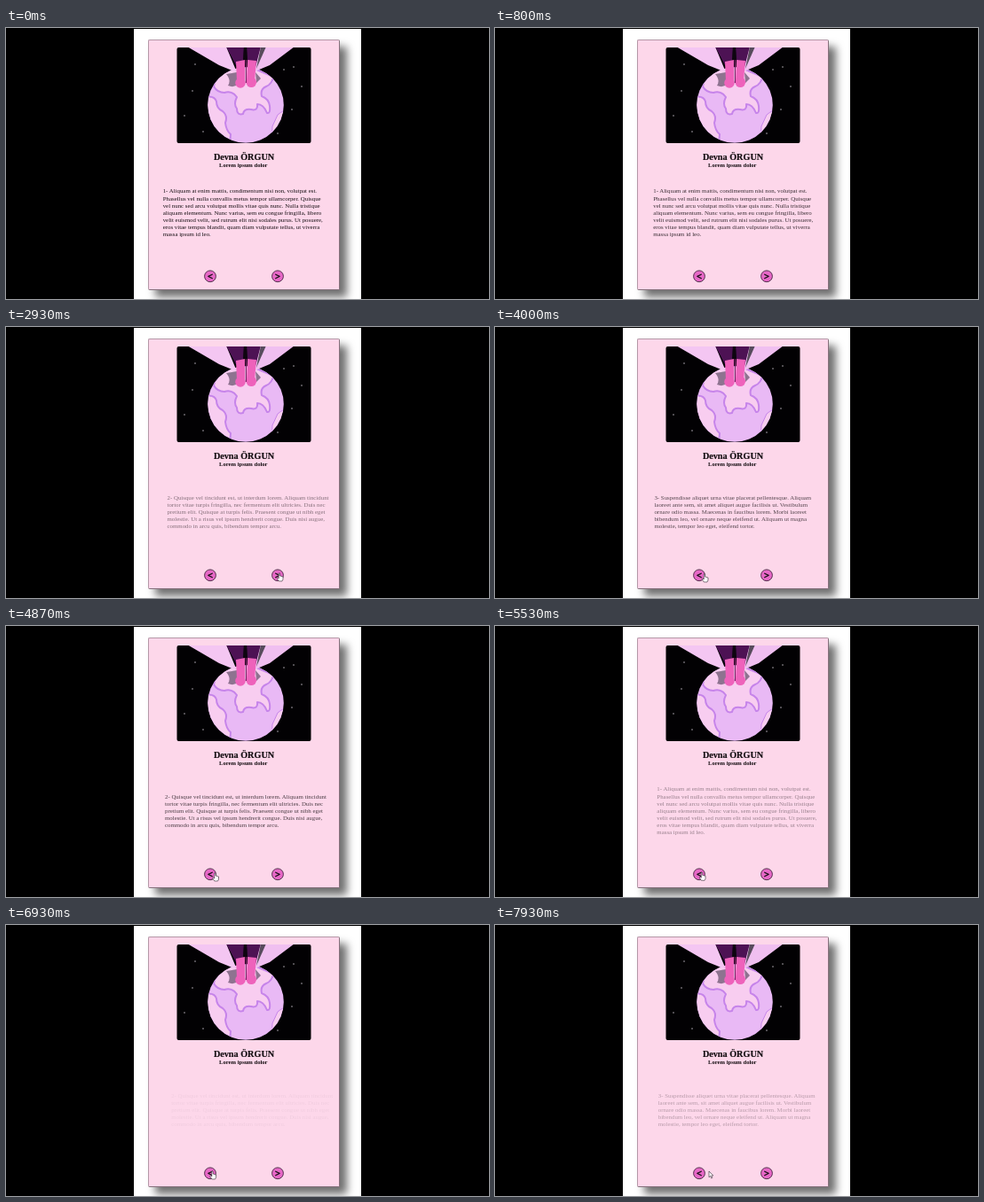
Recreate the animation shown at these times as an HTML page. Size 544 by 306 pixels, loop 8000 ms.

```html
<!DOCTYPE html>
<html lang="en">
<head>
<meta charset="utf-8">
<title>Card slider</title>
<style>
  html, body { margin: 0; width: 100%; height: 100%; overflow: hidden; background: #000; }
  .page { position: absolute; left: 144px; top: 1px; width: 256px; height: 305px; overflow: hidden; background: #fff; }
  .card {
    position: absolute; left: 16px; top: 12px; width: 214px; height: 281px;
    border: 1px solid; border-color: #b597a7 #85707c #85707c #b597a7;
    border-radius: 2px; background: #fdd7ea;
    box-shadow: 8px 8px 10px #707070;
  }
  svg { position: absolute; left: 0; top: -1px; }
  text { font-family: "Liberation Serif", "Times New Roman", serif; fill: #161014; }
  .mid { text-anchor: middle; font-weight: bold; }
  .slide text { font-size: 6.87px; }
</style>
</head>
<body>
<div class="page">
  <div class="card"></div>
  <svg width="256" height="306" viewBox="144 0 256 306">
    <defs>
      <clipPath id="photo"><rect x="192.5" y="22" width="151" height="108" rx="2"/></clipPath>
      <clipPath id="disc"><circle cx="270" cy="87" r="42.5"/></clipPath>
    </defs>

    <g clip-path="url(#photo)">
      <rect x="192" y="22" width="152" height="109" fill="#020103"/>
      <g id="stars" fill="#d8d0da"></g>
      <circle cx="270" cy="87" r="42.8" fill="#e9b9f5"/>
      <g clip-path="url(#disc)" fill="#f8cdf0" stroke="#c684ea" stroke-width="2" stroke-linejoin="round">
        <path d="M236 58Q250 42 275 44L301 55Q300 63 293 66Q286 69 288 77Q296 80 297 88Q298 97 294 96Q290 86 283 86Q284 94 276 92Q268 91 267 97Q260 99 260 91Q256 86 260 78Q254 70 246 73Q238 73 234 66Z"/>
        <path d="M224 78Q235 76 237 83Q237 91 244 94Q250 99 247 107Q248 116 253 120L252 132L226 126Z"/>
        <path d="M306 98Q313 92 316 94L308 118Q298 122 300 111Z" stroke-width="1"/>
      </g>
      <path d="M204 21H248L260 50L240 42Z" fill="#f4c6f2"/>
      <path d="M325 21H286L278 50L297 42Z" fill="#f0bff0"/>
      <path d="M248 52Q254 59 250 65Q257 68 262 63L260 50ZM281 50L287 57L282 62Z" fill="#8e7390"/>
      <path d="M248 21H268L267 44H260ZM271 21H287L281 44H272Z" fill="#4d1254"/>
      <path d="M268 21H271L272 40H267Z" fill="#0d050f"/>
      <path d="M287 21H293L282 46Z" fill="#574b5c"/>
      <g fill="#ee62bb">
        <path d="M259 38L269 36V60H260ZM272 36L282 37L280 60H271Z"/>
        <circle cx="264" cy="62" r="5.8"/>
        <circle cx="276.3" cy="61.3" r="5.8"/>
      </g>
      <path d="M270.4 36V62" stroke="#7a2468" stroke-width="1.2"/>
    </g>

    <text class="mid" x="268" y="148.6" font-size="10.2" stroke="#161014" stroke-width=".2">Devna ÖRGUN</text>
    <text class="mid" x="267.3" y="157.4" font-size="6.6">Lorem ipsum dolor</text>
    <g id="slides"></g>

    <g fill="#e768c7" stroke="#43243f" stroke-width=".9">
      <circle cx="230" cy="280.3" r="6.4"/>
      <circle cx="306" cy="280.3" r="6.4"/>
    </g>
    <g class="mid" font-size="10.5" stroke="#161014" stroke-width=".5">
      <text x="230" y="283.6">&lt;</text>
      <text x="306" y="283.6">&gt;</text>
    </g>

    <g id="cursor" fill="#fff" stroke="#302530" stroke-width=".6" stroke-linejoin="round">
      <path id="hand" d="M-.8 0H.6V3L4 4V7L3 9H-.7L-3 5.6L-2.2 5L-.8 6Z"/>
      <path id="arrow" d="M0 0V6.8L1.6 5.4L2.7 8L3.8 7.5L2.7 5H4.8Z"/>
    </g>
  </svg>
</div>
<script>
const LOOP = 8000, FADE = 1000, SHIFT = 10, LEFT = 176.7, MIDDLE = 210.6, LEADING = 8.05;

const texts = [
  ["1- Aliquam at enim mattis, condimentum nisi non, volutpat est.",
   "Phasellus vel nulla convallis metus tempor ullamcorper. Quisque",
   "vel nunc sed arcu volutpat mollis vitae quis nunc. Nulla tristique",
   "aliquam elementum. Nunc varius, sem eu congue fringilla, libero",
   "velit euismod velit, sed rutrum elit nisi sodales purus. Ut posuere,",
   "eros vitae tempus blandit, quam diam vulputate tellus, ut viverra",
   "massa ipsum id leo."],
  ["2- Quisque vel tincidunt est, ut interdum lorem. Aliquam tincidunt",
   "tortor vitae turpis fringilla, nec fermentum elit ultricies. Duis nec",
   "pretium elit. Quisque at turpis felis. Praesent congue ut nibh eget",
   "molestie. Ut a risus vel ipsum hendrerit congue. Duis nisi augue,",
   "commodo in arcu quis, bibendum tempor arcu."],
  ["3- Suspendisse aliquet urna vitae placerat pellentesque. Aliquam",
   "laoreet ante sem, sit amet aliquet augue facilisis ut. Vestibulum",
   "ornare odio massa. Maecenas in faucibus lorem. Morbi laoreet",
   "bibendum leo, vel ornare neque eleifend ut. Aliquam ut magna",
   "molestie, tempor leo eget, eleifend tortor."]
];

// [start time, slide]
const steps = [
  [-FADE, 0], [250, 0], [2630, 1], [3570, 2], [4400, 1], [5270, 0],
  [6430, 2], [6865, 1], [7300, 0], [7730, 2]
];

// [time, x, y]
const path = [
  [1650, 402, 286], [2050, 350, 284], [2470, 308, 278], [3620, 308, 278],
  [3930, 236, 279], [4900, 235.5, 279], [5900, 232, 278], [7780, 233, 278], [7920, 241, 278]
];

const $ = id => document.getElementById(id);
const add = (parent, tag, attrs) => {
  const el = document.createElementNS("http://www.w3.org/2000/svg", tag);
  for (const k in attrs) el.setAttribute(k, attrs[k]);
  return parent.appendChild(el);
};

for (const [cx, cy] of [[213, 41], [210, 71], [201, 99], [222, 117], [313, 47],
                        [324, 44], [333, 66], [322, 92], [306, 119]])
  add($("stars"), "circle", { cx, cy, r: .7 });

const slides = texts.map(lines => {
  const g = add($("slides"), "g", { class: "slide" });
  lines.forEach((line, i) => {
    const y = MIDDLE + (i - (lines.length - 1) / 2) * LEADING;
    add(g, "text", { x: LEFT, y }).textContent = line;
  });
  return g;
});

// cubic-bezier(.25, .1, .25, 1)
const bezier = (s, a, b) => 3 * (1 - s) * (1 - s) * s * a + 3 * (1 - s) * s * s * b + s * s * s;
function ease(t) {
  if (t >= 1) return 1;
  let lo = 0, hi = 1;
  for (let i = 0; i < 20; i++) {
    const mid = (lo + hi) / 2;
    if (bezier(mid, .25, .25) < t) lo = mid; else hi = mid;
  }
  return bezier(lo, .1, 1);
}

function cursorAt(t) {
  const i = path.findIndex(p => p[0] > t);
  if (i < 0) return path[path.length - 1].slice(1);
  const [t0, x0, y0] = path[i - 1], [t1, x1, y1] = path[i];
  const k = (t - t0) / (t1 - t0), e = k * k * (3 - 2 * k);
  return [x0 + (x1 - x0) * e, y0 + (y1 - y0) * e];
}

function draw(t) {
  const [start, current] = steps.filter(s => s[0] <= t).pop();
  const shown = ease((t - start) / FADE);
  slides.forEach((g, i) => {
    g.setAttribute("opacity", i === current ? shown : 0);
    g.setAttribute("transform", `translate(${SHIFT * (1 - shown)} 0)`);
  });

  const visible = t >= path[0][0];
  $("cursor").style.display = visible ? "" : "none";
  if (!visible) return;
  const [x, y] = cursorAt(t);
  const over = [230, 306].some(cx => Math.hypot(x - cx, y - 280.3) < 6.5);
  $("cursor").setAttribute("transform", `translate(${x} ${y})`);
  $("hand").style.display = over ? "" : "none";
  $("arrow").style.display = over ? "none" : "";
}

const origin = performance.now();
function tick() {
  draw((performance.now() - origin) % LOOP);
  requestAnimationFrame(tick);
}
tick();
</script>
</body>
</html>
```
